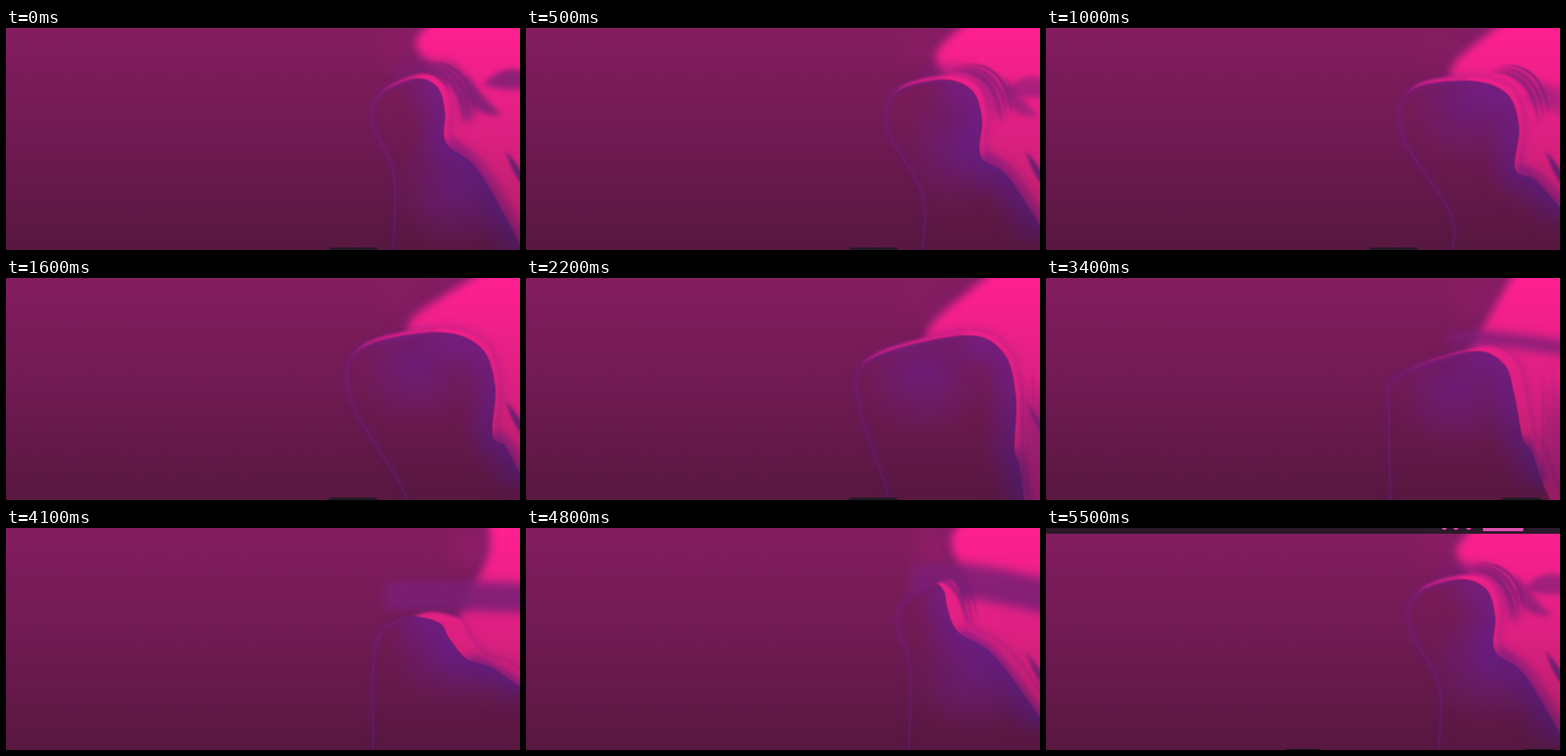
An HTML page with a canvas that plays this animation: 800 by 347 pixels, repeating every 5600 ms.

```html
<!DOCTYPE html>
<html lang="en">
<head>
<meta charset="utf-8">
<title>Magenta flow</title>
<style>
html, body { margin: 0; width: 100%; height: 100%; overflow: hidden; background: #701a50; }
canvas { display: block; width: 100vw; height: 100vh; }
</style>
</head>
<body>
<canvas id="stage" width="800" height="347"></canvas>
<script>
const W = 800, H = 347, LOOP = 5600, STEP = 100;
const CYCLE = 5200; // the flow repeats a little sooner than the loop restarts
const ctx = document.getElementById('stage').getContext('2d');

const shade = (...stops) => {
  const g = ctx.createLinearGradient(0, 0, 0, H);
  stops.forEach((c, i) => g.addColorStop(i / (stops.length - 1), c));
  return g;
};
const base = shade('#841d60', '#701a52', '#581840');
const pink = shade('#ff2090', '#da2080', '#a91f64');
const purple = shade('#81208a', '#6b1d84', '#4c1a60');
const fold = shade('#871e72', '#732078', '#5b1b62');

const lerp = (a, b, k) => a + (b - a) * k;

// A value that moves between a few keys and wraps around at CYCLE.
function track(keys) {
  const stops = Object.entries(keys).map(([at, v]) => [+at, v]);
  stops.push([CYCLE, stops[0][1]]);
  return t => {
    const i = stops.findIndex(([at]) => at > t);
    const [t0, a] = stops[i - 1], [t1, b] = stops[i];
    return lerp(a, b, (t - t0) / (t1 - t0));
  };
}

const motion = {
  left: track({ 0: 571, 1000: 555, 2800: 502, 4100: 571, 4800: 578 }),
  right: track({ 0: 683, 1000: 736, 1600: 761, 2800: 763, 4100: 690, 4800: 656 }),
  top: track({ 0: 79, 1600: 85, 2800: 95, 4100: 139, 4800: 88 }),
  crown: track({ 0: 638, 2800: 690, 4100: 625 }),
  slope: track({ 0: 25, 1000: 16, 2800: 52, 4100: 27 }),
  waistY: track({ 0: 232, 1600: 330, 4100: 340, 4800: 220 }),
  waistIn: track({ 0: 33, 1000: 76, 1600: 80, 2800: 4, 4100: 0, 4800: 20 }),
  hipY: track({ 0: 180, 1600: 245, 2800: 290, 4100: 205, 4800: 163 }),
  hipOut: track({ 0: 2, 1000: -6, 2800: 0, 4100: 27, 4800: 17 }),
  endX: track({ 0: 806, 1600: 806, 2800: 745, 4100: 806 }),
  endY: track({ 0: 350, 1000: 288, 2800: 380, 4100: 253, 4800: 305 }),
  ridgeX: track({ 0: 638, 2800: 642, 4100: 750, 4800: 662 }),
  ridgeY: track({ 0: 28, 1000: 50, 2800: 66, 4100: 45, 4800: 25 }),
  ridgeLean: track({ 0: 30, 1600: 112, 2800: 75, 4100: 0 }),
  rootX: track({ 0: 690, 1000: 628, 2800: 615, 4100: 700 }),
  bandX: track({ 0: 8, 2800: 6, 4100: 30, 4800: 22 }),
  gap: track({ 0: 16, 1000: 0, 2800: 0, 4100: 46, 4800: 54 }),
  gapY: track({ 0: 66, 2800: 85, 4100: 106, 4800: 84 }),
  gapEndX: track({ 0: 720, 2800: 815, 4800: 815 }),
  gapEndY: track({ 0: 145, 2800: 112, 4800: 108 }),
  glowX: track({ 0: 700, 1000: 660, 2800: 600, 4100: 690 }),
  glowY: track({ 0: 250, 1000: 118, 2800: 165, 4100: 185 }),
  wisps: track({ 0: .8, 1000: .8, 1600: 0, 4100: 0, 4800: .7 }),
  eddies: track({ 0: .85, 1600: 0, 4800: 0 }),
  fringe: track({ 0: .8, 1600: .8, 2800: 0, 4100: 0 }),
  curtain: track({ 0: 0, 1600: 0, 2800: .8, 3800: 0 })
};
const holds = [[2500, 2800], [3500, 3800]];

const poseAt = t =>
  Object.fromEntries(Object.entries(motion).map(([name, at]) => [name, at(t % CYCLE)]));

// Smooth open curve through the points.
function spline(pts) {
  const path = new Path2D();
  const at = i => pts[Math.max(0, Math.min(pts.length - 1, i))];
  path.moveTo(...pts[0]);
  for (let i = 0; i < pts.length - 1; i++) {
    const [p, a, b, q] = [at(i - 1), at(i), at(i + 1), at(i + 2)];
    path.bezierCurveTo(a[0] + (b[0] - p[0]) / 6, a[1] + (b[1] - p[1]) / 6,
      b[0] - (q[0] - a[0]) / 6, b[1] - (q[1] - a[1]) / 6, ...b);
  }
  return path;
}

function enclose(path, ...corners) {
  corners.forEach(c => path.lineTo(...c));
  path.closePath();
  return path;
}

function shifted(path, x, y) {
  const moved = new Path2D();
  moved.addPath(path, new DOMMatrix([1, 0, 0, 1, x, y]));
  return moved;
}

function paint(path, style, blur, alpha = 1, lineWidth = 0) {
  if (alpha < .02) return;
  ctx.filter = `blur(${blur}px)`;
  ctx.globalAlpha = alpha;
  ctx.fillStyle = ctx.strokeStyle = style;
  ctx.lineWidth = lineWidth;
  lineWidth ? ctx.stroke(path) : ctx.fill(path);
  ctx.filter = 'none';
  ctx.globalAlpha = 1;
}

function spot(x, y, r, rgb, alpha) {
  const g = ctx.createRadialGradient(x, y, 0, x, y, r);
  g.addColorStop(0, `rgba(${rgb},${alpha})`);
  g.addColorStop(.5, `rgba(${rgb},${alpha / 2})`);
  g.addColorStop(1, `rgba(${rgb},0)`);
  ctx.fillStyle = g;
  ctx.fillRect(x - r, y - r, 2 * r, 2 * r);
}

// Lens shape, pointed at both ends and bent towards the control point.
function leaf([ax, ay], [bx, by], [cx, cy], width, alpha) {
  const len = Math.hypot(cx - ax, cy - ay);
  const nx = -(cy - ay) / len * width, ny = (cx - ax) / len * width;
  const path = new Path2D();
  path.moveTo(ax, ay);
  path.quadraticCurveTo(bx + nx, by + ny, cx, cy);
  path.quadraticCurveTo(bx - nx, by - ny, ax, ay);
  paint(path, fold, 1 + width / 8, alpha);
}

function bodyPoints(p) {
  const tipY = p.top + p.slope;
  const waistX = p.left + p.waistIn;
  const hip = [p.right + p.hipOut, p.hipY];
  return [
    [waistX - 3, H + 18],
    [waistX, p.waistY],
    [p.left, lerp(tipY, p.waistY, .36)],
    [p.left + 11, tipY],
    [p.crown, p.top],
    [lerp(p.right, p.crown, .25), lerp(p.top, p.hipY, .14)],
    [p.right, lerp(p.top, p.hipY, .52)],
    hip,
    [lerp(hip[0], p.endX, .42), lerp(p.hipY, p.endY, .26)],
    [p.endX, p.endY]
  ];
}

function drawFolds(p, t) {
  for (let i = 0; i < 3; i++) {
    const x = p.right + 8 * i, y = p.top - 5 * i;
    leaf([x - 50, y - 14], [x + 24, y - 22], [x + 31, y + 70], 9 - 2 * i, p.wisps);
  }
  leaf([p.right + 33, p.top - 8], [p.right + 40, p.top + 42], [p.right + 88, p.top + 58], 24, p.eddies);
  const eyeY = 88 + t % CYCLE / 40;
  leaf([742, eyeY], [790, eyeY - 16], [830, eyeY], 32, p.eddies);
  for (let i = 0; i < 3; i++)
    leaf([778 + 5 * i, 192 + 9 * i], [790 + 5 * i, 215 + 9 * i], [812, 252], 8, p.fringe);
  for (let i = 0; i < 6; i++) {
    const x = 773 + 8 * i, start = 150 + 14 * Math.sin(i * 2.4);
    leaf([x, start], [x + 2, 270], [x, H + 60], 7 + i, p.curtain);
  }
}

function drawBars(t) {
  const box = (x, y, w, h, r, color) => {
    ctx.fillStyle = color;
    ctx.beginPath();
    ctx.roundRect(x, y, w, h, r);
    ctx.fill();
  };
  const tab = (x, w, y = 343) => box(x, y, w, 10, 4, '#241a24');
  if (t < 2800) tab(503, 75);
  else if (t < 3800) tab(710, 61);
  else if (t >= 5500) {
    tab(372, 56, 345);
    tab(743, 49, 345);
    box(0, 0, W, 9, 0, '#2b1a2a');
    [620, 638, 658].forEach(x => box(x - 4, -5, 8, 8, 4, '#d04aa4'));
    box(680, -4, 63, 9, 2, '#e050ae');
  }
}

function draw(t) {
  const p = poseAt(t);
  const pts = bodyPoints(p);
  const body = enclose(spline(pts), [W + 20, H + 75], [pts[0][0], H + 75]);
  const band = shifted(body, p.bandX, -7);
  const cloud = enclose(
    spline([[p.rootX, p.top + 8], [p.ridgeX, p.ridgeY], [p.ridgeX + p.ridgeLean, -15]]),
    [W + 20, -15], [W + 20, H + 50], [p.right, H + 50], [p.right - 30, p.top + 40]);

  ctx.fillStyle = base;
  ctx.fillRect(0, 0, W, H);
  spot(p.ridgeX - 25, 35, 50, '205,30,145', .08 + p.gap / 400);
  paint(cloud, purple, 15, .55);
  paint(cloud, pink, 7);
  if (p.gap > 1) {
    const gap = spline([[p.crown - 35, p.gapY], [695, p.gapY], [p.gapEndX, p.gapEndY]]);
    paint(gap, fold, 8, .9, p.gap);
  }

  // The left flank stays free of pink, so the band is cut at the tip.
  ctx.save();
  ctx.beginPath();
  ctx.rect(p.left + 4, 0, W, H);
  ctx.clip();
  paint(band, purple, 8, .5);
  paint(band, pink, 2);
  ctx.restore();
  drawFolds(p, t);

  paint(body, base, 1.2);
  ctx.save();
  ctx.clip(body);
  spot(p.glowX, p.glowY, 100, '105,30,140', .6);
  paint(spline(pts.slice(4)), purple, 16, .8, 58);
  ctx.restore();
  paint(spline(pts.slice(7)), purple, 7, .75, 16);

  const flank = spline(pts.slice(0, 5));
  paint(flank, purple, 5, .4, 9);
  paint(flank, '#86248f', 1.2, .4, 2);
  drawBars(t);
}

let shown = -1;
function tick() {
  let t = Math.floor(performance.now() % LOOP / STEP) * STEP;
  const hold = holds.find(([from, to]) => t >= from && t < to);
  if (hold) t = hold[0];
  if (t !== shown) draw(shown = t);
  requestAnimationFrame(tick);
}
tick();
</script>
</body>
</html>
```
